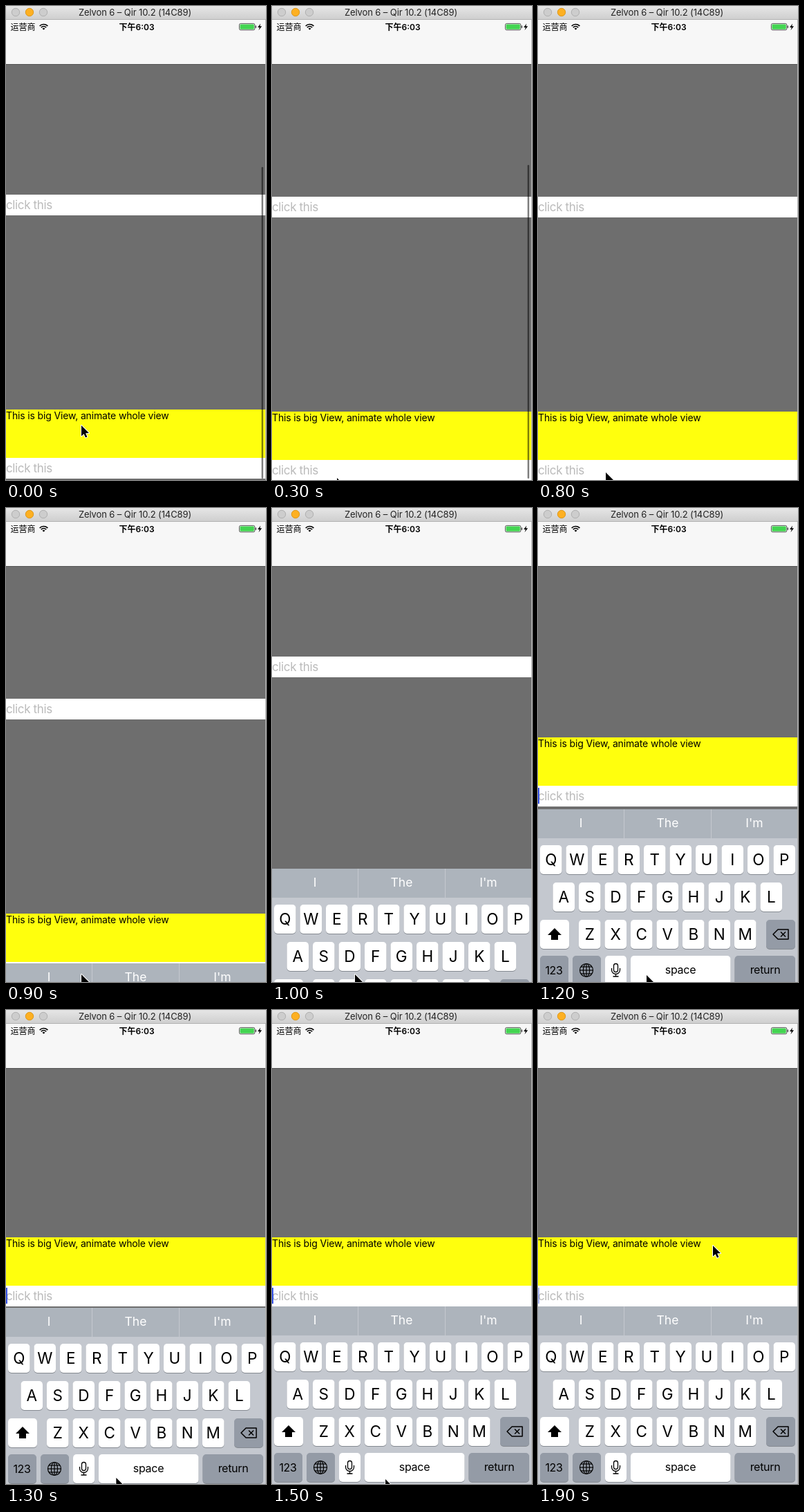
Animation, 376 px wide and 686 px high, one loop 2000 ms. Source, as an HTML page with a canvas:

```html
<!DOCTYPE html>
<html lang="zh">
<head>
<meta charset="utf-8">
<title>Keyboard avoidance</title>
<style>
html, body { margin: 0; width: 100%; height: 100%; overflow: hidden; background: #6e6e6e; }
canvas { display: block; width: 376px; height: 686px; }
</style>
</head>
<body>
<canvas id="stage" width="376" height="686"></canvas>
<script>
const W = 376, H = 686, LOOP = 2000, STEP = 100;
const FONT = 'Inter, "Noto Sans CJK SC", "Noto Sans CJK", sans-serif';
const KEY_DARK = '#949ba6';
const ctx = document.getElementById('stage').getContext('2d');

// Pointer tip: time, x, y
const POINTER = [
  [0, 109, 607], [100, 103, 650], [200, 96, 680], [300, 94, 683],
  [800, 98, 675], [1000, 120, 675], [1200, 157, 676], [1500, 164, 679],
  [1700, 186, 625], [1800, 224, 470], [1900, 253, 341]
];

const clamp = v => Math.max(0, Math.min(1, v));

// Remaining part of a critically damped move
function spring(t, start, rate) {
  const x = Math.max(0, t - start) * rate;
  return (1 + x) * Math.exp(-x);
}

function along(path, t) {
  let i = 1;
  while (i < path.length - 1 && path[i][0] < t) i++;
  const [t0, x0, y0] = path[i - 1], [t1, x1, y1] = path[i];
  const k = clamp((t - t0) / (t1 - t0));
  return [x0 + (x1 - x0) * k, y0 + (y1 - y0) * k];
}

function rect(x, y, w, h, color) {
  ctx.fillStyle = color;
  ctx.fillRect(x, y, w, h);
}

function round(x, y, w, h, r, color) {
  ctx.fillStyle = color;
  ctx.beginPath();
  ctx.roundRect(x, y, w, h, r);
  ctx.fill();
}

function text(s, x, y, size, { color = '#000', align = 'left', weight = 400, gap = 0 } = {}) {
  ctx.font = `${weight} ${size}px ${FONT}`;
  ctx.letterSpacing = gap + 'px';
  ctx.textAlign = align;
  ctx.fillStyle = color;
  ctx.fillText(s, x, y);
}

function trace(points, close = true) {
  ctx.beginPath();
  points.forEach(([x, y]) => ctx.lineTo(x, y));
  if (close) ctx.closePath();
}

function at(x, y, draw) {
  ctx.save();
  ctx.translate(x, y);
  draw();
  ctx.restore();
}

function field(y) {
  rect(0, y, W, 30, '#fff');
  text('click this', 0, y + 20.5, 17, { color: '#bbb', gap: -0.36 });
}

function content(y, t) {
  rect(0, 0, W, H, '#6e6e6e');
  field(y);
  const big = y + 311;
  rect(0, big, W, 70, '#ffff0d');
  text('This is big View, animate whole view', 0, big + 13.5, 14, { gap: -0.15 });
  field(big + 70);
  if (t >= 1000) {
    ctx.globalAlpha = clamp((2000 - t) / 250);
    rect(0, big + 73, 2, 23, '#3a57e8');
    ctx.globalAlpha = 1;
  }
  const fade = clamp((700 - t) / 300);
  if (fade) round(369.5, 506 - y, 2.5, 178 + y, 1.2, `rgba(0,0,0,${0.5 * fade})`);
}

function key(x, y, w, color = '#fff') {
  round(x, y + 1, w, 42, 5, '#858a91');
  round(x, y, w, 42, 5, color);
}

function letters(row, x, y) {
  [...row].forEach((c, i) => {
    const left = x + i * 37.5;
    key(left, y, 31.5);
    text(c, left + 15.75, y + 29, 22.5, { align: 'center' });
  });
}

function shiftIcon() {
  trace([[0, -9], [10, 1], [5, 1], [5, 8], [-5, 8], [-5, 1], [-10, 1]]);
  ctx.fillStyle = '#000';
  ctx.fill();
}

function deleteIcon() {
  trace([[-11, 0], [-4, -7], [11, -7], [11, 7], [-4, 7]]);
  ctx.stroke();
  trace([[0, -3.5], [7, 3.5]], false);
  ctx.stroke();
  trace([[0, 3.5], [7, -3.5]], false);
  ctx.stroke();
}

function globeIcon() {
  ctx.lineWidth = 1.2;
  for (const rx of [9.5, 4.6]) {
    ctx.beginPath();
    ctx.ellipse(0, 0, rx, 9.5, 0, 0, 7);
    ctx.stroke();
  }
  for (const [a, b, c, d] of [[0, -9.5, 0, 9.5], [-9.5, 0, 9.5, 0], [-8, -5, 8, -5], [-8, 5, 8, 5]]) {
    trace([[a, b], [c, d]], false);
    ctx.stroke();
  }
}

function micIcon() {
  ctx.lineWidth = 1.3;
  ctx.beginPath();
  ctx.roundRect(-3, -9.5, 6, 12, 3);
  ctx.stroke();
  ctx.beginPath();
  ctx.moveTo(-6, -3);
  ctx.arc(0, -0.5, 6, Math.PI, 0, true);
  ctx.lineTo(6, -3);
  ctx.moveTo(0, 5.5);
  ctx.lineTo(0, 9);
  ctx.moveTo(-4, 9);
  ctx.lineTo(4, 9);
  ctx.stroke();
}

function keyboard(y) {
  if (y >= H) return;
  rect(0, y, W, 260, '#c4c8cf');
  rect(0, y, W, 42, '#adb4bc');
  rect(124, y, 1, 42, '#c4c8cf');
  rect(250, y, 1, 42, '#c4c8cf');
  ['I', 'The', "I'm"].forEach((word, i) =>
    text(word, 62 + i * 125.5, y + 25.5, 17.5, { color: '#fff', align: 'center' }));

  letters('QWERTYUIOP', 3, y + 52);
  letters('ASDFGHJKL', 21.5, y + 106);
  letters('ZXCVBNM', 59, y + 160);
  key(3, y + 160, 42);
  key(330, y + 160, 42, KEY_DARK);
  key(3, y + 212, 41, KEY_DARK);
  key(50, y + 212, 41, KEY_DARK);
  key(97, y + 212, 31);
  key(134, y + 212, 144.5);
  key(284.5, y + 212, 87.5, KEY_DARK);

  const label = { align: 'center', gap: -0.3 };
  text('123', 23, y + 239, 16, label);
  text('space', 206, y + 238, 16, label);
  text('return', 328.5, y + 238, 16, label);

  ctx.strokeStyle = '#000';
  ctx.lineWidth = 1.5;
  ctx.lineJoin = 'round';
  at(24, y + 181, shiftIcon);
  at(351, y + 181, deleteIcon);
  at(70, y + 233, globeIcon);
  at(112.5, y + 233, micIcon);
}

function wifi() {
  ctx.strokeStyle = ctx.fillStyle = '#000';
  ctx.lineWidth = 1.7;
  for (const r of [8, 5]) {
    ctx.beginPath();
    ctx.arc(0, 0, r, -Math.PI * 0.76, -Math.PI * 0.24);
    ctx.stroke();
  }
  ctx.beginPath();
  ctx.moveTo(0, 0);
  ctx.arc(0, 0, 2.7, -Math.PI * 0.76, -Math.PI * 0.24);
  ctx.fill();
}

function battery() {
  ctx.strokeStyle = '#333';
  ctx.lineWidth = 0.8;
  ctx.beginPath();
  ctx.roundRect(337.4, 25.4, 22.4, 9.4, 2);
  ctx.stroke();
  round(338.5, 26.5, 20.2, 7.2, 1, '#43d551');
  round(360.6, 28.3, 1.3, 3.6, 0.6, '#333');
  trace([[368, 25.5], [364, 31], [366.7, 31], [365.5, 35], [370, 29.3], [367.2, 29.3]]);
  ctx.fillStyle = '#000';
  ctx.fill();
}

function header() {
  rect(0, 20, W, 64, '#f7f7f7');
  rect(0, 84, W, 1, '#535353');
  text('运营商', 6.5, 34.5, 12);
  at(54.5, 34.5, wifi);
  text('下午6:03', 189, 34.5, 12, { align: 'center', weight: 600 });
  battery();

  const bar = ctx.createLinearGradient(0, 0, 0, 19);
  bar.addColorStop(0, '#e6e6e6');
  bar.addColorStop(1, '#cfcfcf');
  rect(0, 0, W, 19, bar);
  rect(0, 19, W, 1, '#b2b2b2');
  ctx.lineWidth = 1;
  [['#cdcdcd', '#b0b0b0'], ['#fdb022', '#dd981c'], ['#cdcdcd', '#b0b0b0']].forEach(([fill, edge], i) => {
    ctx.beginPath();
    ctx.arc(14 + i * 20, 9, 5.7, 0, 7);
    ctx.fillStyle = fill;
    ctx.strokeStyle = edge;
    ctx.fill();
    ctx.stroke();
  });
  text('Zelvon 6 – Qir 10.2 (14C89)', 186.5, 14, 13, { color: '#222', align: 'center', gap: -0.1 });
}

function pointer() {
  trace([[0, 0], [0, 15.5], [3.6, 12.2], [6, 17.5], [8.4, 16.5], [6.1, 11.3], [11, 11]]);
  ctx.lineJoin = 'round';
  ctx.lineWidth = 2;
  ctx.strokeStyle = '#fff';
  ctx.stroke();
  ctx.fillStyle = '#000';
  ctx.fill();
}

function draw(t) {
  const rest = 276 - 3 * Math.exp(-t / 100);
  const top = rest - 258 * (1 - spring(t, 966, 0.0273));
  const board = 429 + 257 * spring(t, 866, 0.01615);
  content(Math.round(top), t);
  keyboard(Math.round(board));
  header();
  rect(375, 20, 1, H - 20, '#b8b8b8');
  at(...along(POINTER, t), pointer);
}

function tick(now) {
  draw(Math.floor(now % LOOP / STEP) * STEP);
  requestAnimationFrame(tick);
}
requestAnimationFrame(tick);
</script>
</body>
</html>
```
